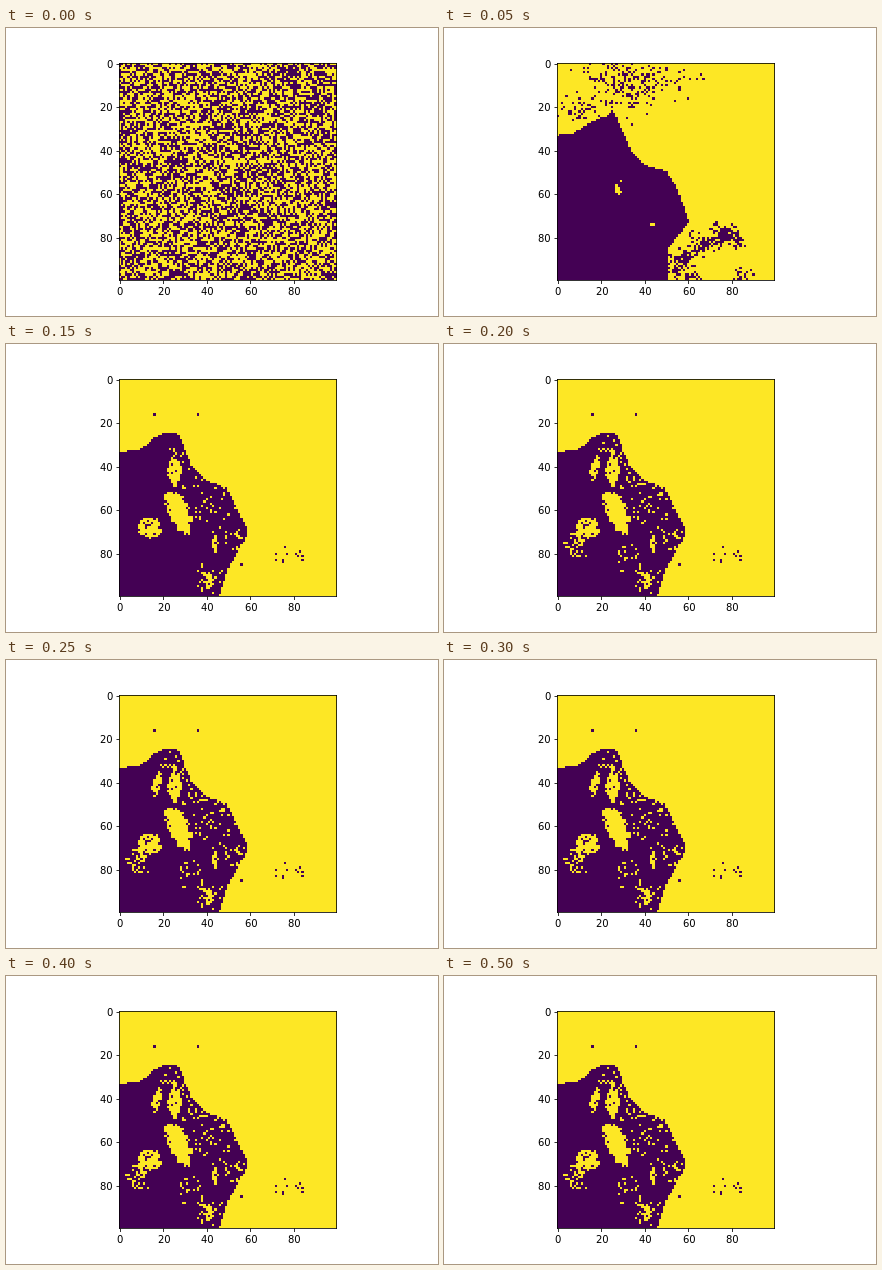
Write an HTML page with a canvas that moves like this. It is 432 px wide and 288 px high and loops after 600 ms.

```html
<!DOCTYPE html>
<html lang="en">
<head>
<meta charset="utf-8">
<title>Pattern recall</title>
<style>
html, body { margin: 0; width: 100%; height: 100%; overflow: hidden; background: #fff; }
#cells { position: absolute; left: 113px; top: 35px; width: 218px; height: 217px; image-rendering: pixelated; }
svg { position: absolute; left: 0; top: 0; }
text { font: 10px "DejaVu Sans", sans-serif; }
</style>
</head>
<body>
<canvas id="cells" width="218" height="217"></canvas>
<svg id="axes" width="432" height="288" viewBox="0 0 432 288"></svg>
<script>
const N = 100, CELL = 2.1744, LEFT = 112.68, TOP = 34.56;
const DARK = '#440154', LIGHT = '#fde725', KEEP = 99;
const ctx = document.getElementById('cells').getContext('2d');

// Axes: labels are placed by the width of their ink, on whole pixels
function drawAxes() {
  const snap = v => Math.floor(v + 0.5) + 0.5;
  let ticks = '', labels = '';
  for (let v = 0; v < N; v += 20) {
    const x = LEFT + (v + 0.5) * CELL, y = TOP + (v + 0.5) * CELL;
    const ink = 6.36 * String(v).length - 1.3;
    ticks += `M${snap(x)} 252.5v3.5M113.5 ${snap(y)}h-3`;
    labels += `<text x="${Math.round(x - ink / 2)}" y="267">${v}</text>` +
      `<text x="${Math.round(105.7 - ink)}" y="${Math.ceil(y + 3.8)}">${v}</text>`;
  }
  const line = (d, cap) => `<path d="${d}" fill="none" stroke="#000" stroke-width=".8" stroke-linecap="${cap}"/>`;
  document.getElementById('axes').innerHTML = line(ticks, 'butt') + labels +
    line('M113.5 35.5v217M330.5 35.5v217', 'square') +
    line('M113.5 35.5h217M113.5 252.5h217', 'square');
}

// Noise that depends only on the cell and a seed
function rnd(x, y, seed) {
  let h = Math.imul(x + 1, 374761393) ^ Math.imul(y + 1, 668265263) ^ Math.imul(seed + 1, 1274126177);
  h = Math.imul(h ^ (h >>> 15), 2246822519);
  h = Math.imul(h ^ (h >>> 13), 3266489917);
  return ((h ^ (h >>> 16)) >>> 0) / 4294967296;
}

// life = last step at which a cell is still dark
const life = new Uint8Array(N * N);
let seed = 1;

function each(fn) {
  for (let y = 0; y < N; y++) for (let x = 0; x < N; x++) fn(x, y, y * N + x);
}

function body(points, last) {
  const path = new Path2D('M' + points + 'Z');
  each((x, y, i) => {
    if (ctx.isPointInPath(path, x + 0.5, y + 0.5)) life[i] = last;
  });
}

// Dark specks, densest in the middle; a share "hold" of them outlives step 1
function cluster(cx, cy, rx, ry, density, hold) {
  const s = seed++;
  each((x, y, i) => {
    const fall = Math.exp(-(((x - cx) / rx) ** 2) - ((y - cy) / ry) ** 2);
    const n = rnd(x, y, s) / (density * fall);
    if (n < 1) life[i] = Math.max(life[i], n < hold / 4 ? KEEP : n < hold ? 2 : 1);
  });
}

// Light gaps in a slanted, ragged ellipse
function hole(cx, cy, rx, ry, density, last, slant = 0) {
  const s = seed++;
  each((x, y, i) => {
    const dy = y - cy, dx = x - cx - slant * dy;
    const rim = (dx / rx) ** 2 + (dy / ry) ** 2 + 0.5 * rnd(x, y, s + 100);
    if (rim < 1.25 && rnd(x, y, s) < density) life[i] = Math.min(life[i], last);
  });
}

function build() {
  body('0 33.6 7 33 14 28.5 23 25 26 22 35 42 43 48.6 50 49.6 55 57 61 73 51 86 51 100 0 100', 1);
  body('0 33.6 9 33.4 18 26.3 22 24.6 27 24.6 34 41 41 47 50 50.6 59 69 59 72 50 88 46 100 0 100', KEEP);

  // Stray specks above, clumps at the lower right
  cluster(28, 10, 12, 9, 0.42, 0.08);
  cluster(45, 6, 13, 10, 0.12, 0);
  cluster(9, 22, 10, 4, 0.25, 0);
  cluster(76, 79, 4, 4, 1.3, 0.5);
  cluster(83, 81, 2, 3, 1, 0.5);
  for (let k = 0; k < 4; k++) cluster(67 - 4 * k, 83 + 3 * k, 4, 3, 0.8, 0.06);
  cluster(61, 98, 4, 2, 1, 0.06);
  cluster(54, 97, 4, 4, 0.4, 0.06);
  cluster(66, 78, 4, 4, 0.2, 0);
  cluster(84, 97, 4, 4, 0.4, 0.1);

  // Holes that open step by step
  hole(28, 57, 2, 4, 0.5, 0);
  hole(44, 74, 1, 2, 0.7, 0);
  hole(28, 60, 4, 7, 0.85, 1, 0.2);
  hole(27, 61, 5, 10, 0.92, 2, 0.4);
  hole(26, 40, 1.3, 10, 0.4, 1);
  hole(25, 42, 3, 6.5, 0.88, 2);
  hole(17, 41, 2, 5.5, 0.88, 3, -0.2);
  hole(15, 69, 4, 3, 0.4, 1);
  hole(14, 68, 5, 5, 0.85, 2);
  hole(9, 76, 6, 6, 0.33, 3);
  hole(44, 76, 1, 5, 0.9, 1);
  hole(41, 93, 2, 4, 0.8, 1);

  // Light specks along the right side of the shape
  for (let step = 1; step < 4; step++) hole(42, 58, 11, 27, 0.05, step, 0.55);
  hole(24, 34, 6, 8, 0.12, 3);
  hole(33, 82, 6, 9, 0.13, 3);
  hole(41, 91, 7, 8, 0.07, 2);
}

// Cell edges rounded to whole pixels
const ex = i => i === N ? 218 : Math.round(LEFT + i * CELL) - 113;
const ey = i => Math.round(TOP + i * CELL) - 35;

function draw(step) {
  ctx.fillStyle = LIGHT;
  ctx.fillRect(0, 0, 218, 217);
  ctx.fillStyle = DARK;
  each((x, y, i) => {
    const dark = step ? life[i] >= step : rnd(x, y, 500) < 0.49;
    if (dark) ctx.fillRect(ex(x), ey(y), ex(x + 1) - ex(x), ey(y + 1) - ey(y));
  });
}

drawAxes();
build();

let shown = -1;
const start = performance.now();
function tick() {
  const t = (performance.now() - start) % 600;
  const step = Math.min(10, Math.floor(t / 50));
  if (step !== shown) draw(shown = step);
  requestAnimationFrame(tick);
}
tick();
</script>
</body>
</html>
```
